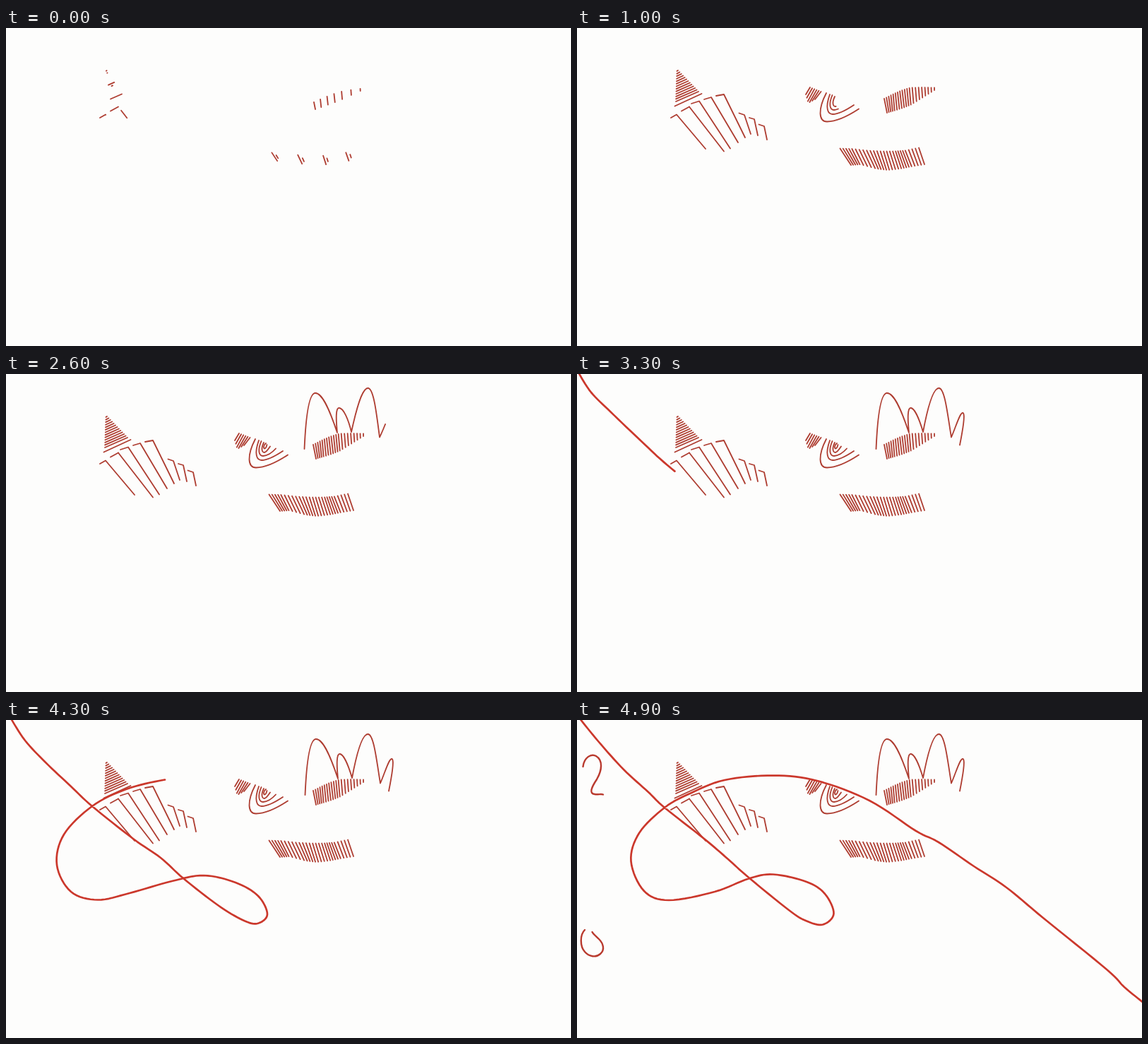
An HTML page that plays this animation: 800 by 450 pixels, repeating every 5000 ms.

```html
<!DOCTYPE html>
<html lang="en">
<head>
<meta charset="utf-8">
<title>Line drawing</title>
<style>
html, body { margin: 0; width: 100%; height: 100%; overflow: hidden; background: #fdfdfc; }
svg { display: block; width: 100vw; height: 100vh; }
path { fill: none; stroke-linecap: round; stroke-linejoin: round; }
</style>
</head>
<body>
<svg id="stage" viewBox="0 0 800 450"></svg>
<script>
const LOOP = 5000, STEP = 100;
const THIN = '#ae3d31', BOLD = '#cb382c';
const stage = document.getElementById('stage');
const strokes = [];

const clamp = v => Math.max(0, Math.min(1, v));
const mix = (a, b, u) => a + (b - a) * u;
const mixPt = (a, b, u) => [mix(a[0], b[0], u), mix(a[1], b[1], u)];
const points = text => text.split(' ').map(p => p.split(',').map(Number));

function makePath(d, width, color) {
  const el = document.createElementNS('http://www.w3.org/2000/svg', 'path');
  el.setAttribute('d', d);
  el.setAttribute('stroke', color);
  el.setAttribute('stroke-width', width);
  stage.appendChild(el);
  return el;
}

// A stroke grows outward from the fraction `from` between start and end.
function addStroke(d, start, end, from = 0, width = 1.8, color = THIN) {
  const el = makePath(d, width, color);
  el.setAttribute('pathLength', 1);
  strokes.push({ el, start, end, from });
}

function reveal(el, p, from = 0) {
  const head = from * (1 - p), tail = from + (1 - from) * p;
  el.style.display = p > 0 ? '' : 'none';
  el.setAttribute('stroke-dasharray', p < 1 ? `${tail - head} 2` : 'none');
  el.setAttribute('stroke-dashoffset', p < 1 ? -head : 0);
}

// Piecewise linear value of [time, value] keys.
function track(keys, t) {
  if (t <= keys[0][0]) return keys[0][1];
  for (let i = 1; i < keys.length; i++) {
    const [t0, v0] = keys[i - 1], [t1, v1] = keys[i];
    if (t <= t1) return mix(v0, v1, (t - t0) / (t1 - t0));
  }
  return keys[keys.length - 1][1];
}

function along(pts, u) {
  const x = u * (pts.length - 1), i = Math.min(pts.length - 2, Math.floor(x));
  return mixPt(pts[i], pts[i + 1], x - i);
}

// Parallel lines between two edges, shared among pens that each do a run.
function hatch(edgeA, edgeB, count, run, first = -100) {
  const a = points(edgeA), b = points(edgeB);
  for (let i = 0; i < count; i++) {
    const u = i / (count - 1), start = first + (i % run) / run * 500;
    addStroke(`M${along(a, u)}L${along(b, u)}`, start, Math.min(600, start + 200), 0.5);
  }
}

// Spire
hatch('141.5,61 140,104', '143,60 172,90', 13, 6);
addStroke('M138.5,110.5L176.5,93', 100, 400, 0.5);

// Columns
addStroke('M133,127L141,122.500L182,171', -60, 400);
addStroke('M148,117.500L159,111.500', -100, 0);
addStroke('M159,111.500L208,174.500', -80, 400, 0.1);
['162,107 173,103.5 217,170.5', '180,101 190,98 228,162', '197,96 208,94 238,155',
 '229.5,120.5 237,123 246,150', '244,127 251,129 256,152', '257.500,136.5 265,139 269,158']
  .forEach((p, i) => addStroke('M' + p.replace(/ /g, 'L'), 50 + i * 50, 350 + i * 50));

// Bands
hatch('330,84 345.500,90', '324,94 327.5,106 337,101', 6, 6, 50);
hatch('435,100 447,94 459,88.5 472,84.5 489,84 506,84.5',
      '439,120 449,117 462,113 474,108 490,98 506,88', 20, 3);
hatch('372.5,170.5 390,171 412,173.5 432,174.5 450,174.5 464,173.5 484,169.5',
      '388,194 401,193 424,199 440,201 458,199 473,196 492,193', 26, 8);

// Nested arcs
addStroke('M353,92C341,115 342,132.5 354,132.5C368,132.5 386,123 399,114.500', 600, 900);
addStroke('M358,94C351,113 355,122 362,122C371,122 383,115 392,109', 600, 1000);
addStroke('M361.5,95C356,108 358,116 364,116C371,115.5 378,110 382,105.5', 600, 1200);
addStroke('M365,97C361,105 362,111 366,111C369,110.5 371,107 374,102.5', 700, 1200);
addStroke('M368,98C364,101 364.5,106 366.500,105.500C368.5,105 369,102 369.500,100', 1000, 1200);

// Peaks
const peaks = makePath('', 1.8, THIN);
peaks.setAttribute('pathLength', 1);
const peakKeys = [[1250, 0], [1600, 0.27], [1800, 0.4], [2400, 0.76], [2600, 0.855], [2900, 1]];
function drawPeaks(t) {
  const dx = track([[1600, -1.5], [2600, -1], [2800, 0]], t);
  const x = 423.5 + dx, y = track([[1600, 108.5], [2600, 106]], t);
  peaks.setAttribute('d', `M${x},${y}C${425.5 + dx},60 ${430 + dx},27 ${439 + dx},27` +
    `C${450 + dx},27 ${461 + dx},56 ${470 + dx},83` +
    `C${468 + dx},62 ${468 + dx},48 ${472.5 + dx},48C478,48 485,65 ${490 + dx},82` +
    'C496,50 504,20 512.5,20C521,20 525,60 ' + (530 + dx) + ',89.500' +
    'C536,76 542,55 546,55C550.5,55 546,80 542,100.500');
  reveal(peaks, track(peakKeys, t));
}

// Long looping line, which settles through three poses as it is drawn
const poseA = points('2,-2 20,26 48,54 92,96 128,129 185,174 220,196 260,229 300,259 338,283 ' +
  '358,288 372.5,275 359,247 330,231 297,222');
const poseB = points('7,-2 27,29 56,60 92,94 122,122 180,168 219,195 251,224 300,262 335,283 ' +
  '356,288 370,275 357,249 325,230 280,220 235,228 175,245 130,254.5 92,243 72,205 82,162 ' +
  '122,122 170,98 225,84.5');
const poseC = points('4,-2 30,30 66,70 101,102 124,124 180,168 214,197 242,222 300,269 324,284 ' +
  '348,289.500 363.5,274 351,246 325,229 278,218.5 243,224.5 195,243 130,255 95,242 76.5,200 ' +
  '88,160 124,124 160,104 209,85 278,78.5 340,86 414,114 480,157 512,173 562,207 608,237 ' +
  '660,280 750,353 775,378 802,400');
const line = makePath('', 2.7, BOLD);
const lineKeys = [[2800, 0], [3000, 1.8], [3600, 6.6], [3900, 14], [4300, 23], [4800, 33.5], [4900, 34]];

function spline(p, i, u) {
  const at = k => p[Math.max(0, Math.min(p.length - 1, k))];
  const [a, b, c, d] = [at(i - 1), at(i), at(i + 1), at(i + 2)];
  return [0, 1].map(k => (b[k] + 0.5 * u * (c[k] - a[k] +
    u * (2 * a[k] - 5 * b[k] + 4 * c[k] - d[k] +
    u * (3 * (b[k] - c[k]) + d[k] - a[k])))).toFixed(2));
}

function drawLine(t) {
  const reach = track(lineKeys, t);
  if (!reach) return line.setAttribute('d', '');
  const toB = clamp((t - 3900) / 400), toC = clamp((t - 4300) / 600);
  const pose = poseC.map((c, i) => {
    const b = poseB[i] || c;
    return mixPt(mixPt(poseA[i] || b, b, toB), c, toC);
  });
  const trail = [];
  for (let x = 0; x < reach; x += 0.125) trail.push(spline(pose, Math.floor(x), x % 1));
  trail.push(spline(pose, Math.floor(reach), reach % 1));
  line.setAttribute('d', 'M' + trail.join('L'));
}

// Curls at the left edge
addStroke('M8.5,66C10,53 20,47 27,51C37,57 35.500,71 28,84C20,96 17,104 25,105C30,106 34,104 37,105.5',
  4500, 4900, 0, 2.4, '#b93a2e');
addStroke('M11,297C4,304 4,320 11,328C17,335 27,336.5 33,331C40,325 37,316 31,310C27,306 23,303 21.5,300',
  4500, 4900, 0, 2.4, '#b93a2e');

function draw(ms) {
  const t = Math.floor(ms % LOOP / STEP) * STEP;
  for (const s of strokes) reveal(s.el, clamp((t - s.start) / (s.end - s.start)), s.from);
  drawPeaks(t);
  drawLine(t);
}

const began = performance.now();
function tick() {
  draw(performance.now() - began);
  requestAnimationFrame(tick);
}
tick();
</script>
</body>
</html>
```
